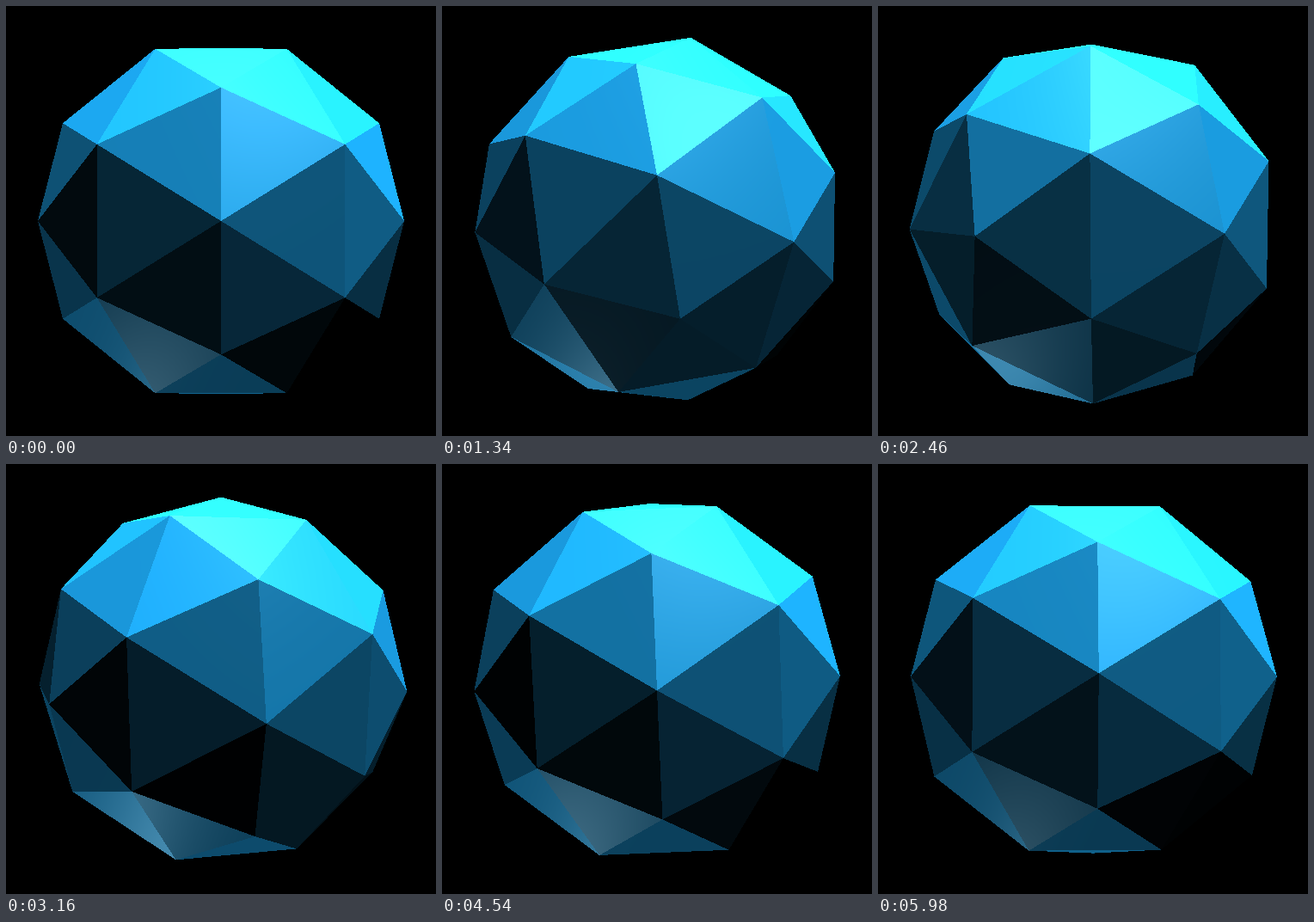
Write an HTML page with a canvas that moves like this. It is 500 px wide and 500 px high and loops after 6 s.

```html
<!DOCTYPE html>
<html lang="en">
<head>
<meta charset="utf-8">
<title>Rotating polyhedron</title>
<style>
  html, body { margin: 0; width: 100%; height: 100%; overflow: hidden; background: #000; }
  canvas { display: block; }
</style>
</head>
<body>
<canvas id="stage" width="500" height="500"></canvas>
<script>
const SIZE = 500, HALF = SIZE / 2;
const LOOP = 6000, STEP = 20;
const FOCAL = HALF / Math.tan(25 * Math.PI / 180);
const CAMERA = 8 / 3;
const COLOR = [27, 160, 230];
const SHININESS = 30, REFLECT = 17 / 255;

const dot = (a, b) => a[0] * b[0] + a[1] * b[1] + a[2] * b[2];
const sub = (a, b) => a.map((v, i) => v - b[i]);
const add = (a, b) => a.map((v, i) => v + b[i]);
const cross = (a, b) => [
  a[1] * b[2] - a[2] * b[1],
  a[2] * b[0] - a[0] * b[2],
  a[0] * b[1] - a[1] * b[0]
];
const unit = a => a.map(v => v / Math.hypot(...a));

// Icosahedron with each face split in four and pushed out to the sphere
function buildFaces() {
  const t = (1 + Math.sqrt(5)) / 2, points = [], faces = [];
  for (const a of [-1, 1]) for (const b of [-t, t]) {
    points.push([a, b, 0], [0, a, b], [b, 0, a]);
  }
  const near = (p, q) => Math.abs(Math.hypot(...sub(p, q)) - 2) < 0.01;
  const addFace = (...tri) => {
    let [a, b, c] = tri.map(unit);
    let normal = unit(cross(sub(b, a), sub(c, a)));
    if (dot(normal, a) < 0) normal = normal.map(v => -v);
    faces.push({ corners: [a, b, c], normal });
  };
  points.forEach((p, i) => points.forEach((q, j) => points.forEach((r, k) => {
    if (i >= j || j >= k || !near(p, q) || !near(q, r) || !near(p, r)) return;
    const pq = unit(add(p, q)), qr = unit(add(q, r)), rp = unit(add(r, p));
    addFace(p, pq, rp);
    addFace(q, qr, pq);
    addFace(r, rp, qr);
    addFace(pq, qr, rp);
  })));
  return faces;
}

// Half vector and Fresnel term depend only on the pixel and the light
function buildLight(position) {
  const dir = unit(position), table = new Float32Array(SIZE * SIZE * 4);
  for (let y = 0, i = 0; y < SIZE; y++) {
    for (let x = 0; x < SIZE; x++, i += 4) {
      const vx = HALF - x - 0.5, vy = y + 0.5 - HALF;
      const len = Math.sqrt(vx * vx + vy * vy + FOCAL * FOCAL);
      let hx = dir[0] + vx / len, hy = dir[1] + vy / len, hz = dir[2] + FOCAL / len;
      const h = Math.sqrt(hx * hx + hy * hy + hz * hz);
      hx /= h; hy /= h; hz /= h;
      const lh = Math.max(0, dir[0] * hx + dir[1] * hy + dir[2] * hz);
      const fresnel = Math.pow(2, (-5.55473 * lh - 6.98316) * lh);
      table[i] = hx;
      table[i + 1] = hy;
      table[i + 2] = hz;
      table[i + 3] = REFLECT + (1 - REFLECT) * fresnel;
    }
  }
  return { dir, table };
}

const faces = buildFaces();
const lights = [[0, 200, 0], [100, 200, 100], [-100, -200, -100]].map(buildLight);
const ctx = document.getElementById("stage").getContext("2d");
const picture = ctx.createImageData(SIZE, SIZE);
const bytes = picture.data;
const words = new Uint32Array(bytes.buffer);

function shine(normal, lit, pixel) {
  let sum = 0;
  for (const { table, amount } of lit) {
    const i = pixel * 4;
    const nh = normal[0] * table[i] + normal[1] * table[i + 1] + normal[2] * table[i + 2];
    if (nh > 0.8) sum += amount * table[i + 3] * Math.pow(nh, SHININESS);
  }
  return sum * 255 * (SHININESS / 2 + 1) / 4;
}

function fillFace(pts, normal) {
  const lit = [];
  let diffuse = 0;
  for (const { dir, table } of lights) {
    const amount = dot(normal, dir);
    if (amount > 0) {
      diffuse += amount;
      lit.push({ table, amount });
    }
  }
  const [red, green, blue] = COLOR.map(c => c * diffuse);
  const ys = pts.map(p => p[1]);
  const top = Math.ceil(Math.min(...ys) - 0.5), bottom = Math.ceil(Math.max(...ys) - 0.5);
  for (let y = top; y < bottom; y++) {
    const mid = y + 0.5;
    let left = SIZE, right = 0;
    for (let k = 0; k < 3; k++) {
      const a = pts[k], b = pts[(k + 1) % 3];
      if ((a[1] <= mid) === (b[1] <= mid)) continue;
      const x = a[0] + (mid - a[1]) * (b[0] - a[0]) / (b[1] - a[1]);
      left = Math.min(left, x);
      right = Math.max(right, x);
    }
    const end = Math.ceil(right - 0.5);
    for (let x = Math.ceil(left - 0.5); x < end; x++) {
      const pixel = y * SIZE + x, i = pixel * 4;
      const gloss = shine(normal, lit, pixel);
      bytes[i] = red + gloss;
      bytes[i + 1] = green + gloss;
      bytes[i + 2] = blue + gloss;
    }
  }
}

function draw(time) {
  const angle = 2 * Math.PI * time / LOOP;
  const c = Math.cos(angle), s = Math.sin(angle);
  // Turn by -angle about y, then by +angle about x
  const turn = ([x, y, z]) => {
    const depth = x * s + z * c;
    return [x * c - z * s, y * c - depth * s, y * s + depth * c];
  };
  const project = ([x, y, z]) => {
    const scale = FOCAL / (CAMERA - z);
    return [HALF + x * scale, HALF - y * scale];
  };
  words.fill(0xff000000);
  for (const face of faces) {
    const normal = turn(face.normal), corners = face.corners.map(turn);
    const toCamera = sub([0, 0, CAMERA], corners[0]);
    if (dot(normal, toCamera) > 0) fillFace(corners.map(project), normal);
  }
  ctx.putImageData(picture, 0, 0);
}

const start = performance.now();
let shown = -1;
function tick() {
  const elapsed = (performance.now() - start) % LOOP;
  const time = Math.floor(elapsed / STEP) * STEP;
  if (time !== shown) draw(shown = time);
  requestAnimationFrame(tick);
}
tick();
</script>
</body>
</html>
```
